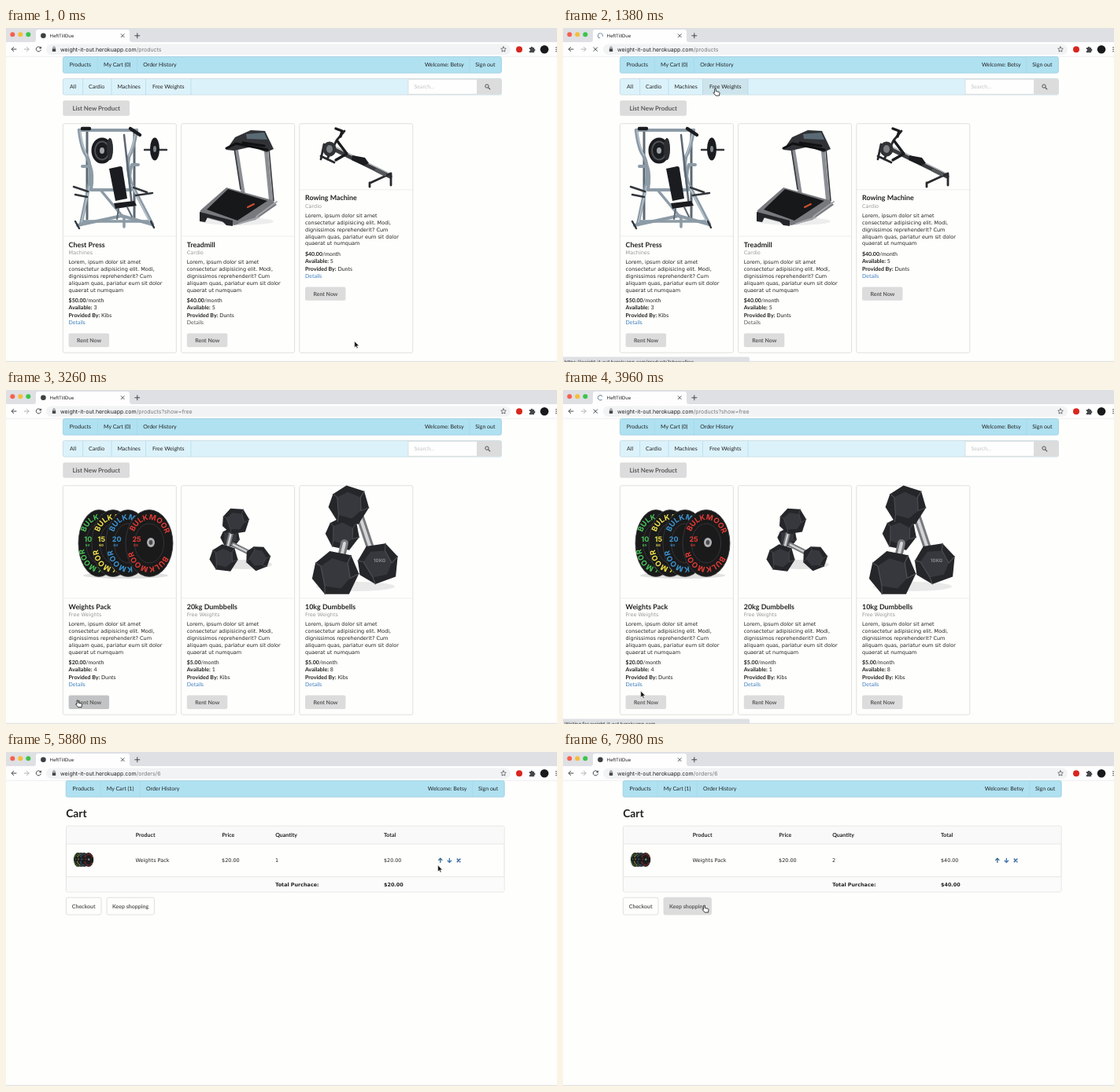
These frames come from a looping animation (700 by 425 pixels, 8 s). An HTML page:

```html
<!DOCTYPE html>
<html lang="en">
<head>
<meta charset="utf-8">
<title>Equipment rental</title>
<style>
html, body { margin: 0; width: 100%; height: 100%; overflow: hidden; background: #fefefd; }
svg { display: block; width: 700px; height: 425px; text-rendering: geometricPrecision; }
text { font: 7px Lato, sans-serif; fill: #222; white-space: pre; }
.b { font-weight: 700; }
.ui { font-family: Inter, sans-serif; }
.v { font: 6.5px "DejaVu Sans", sans-serif; }
.vb { font: 700 6.4px "DejaVu Sans", sans-serif; }
.btn { fill: #5a5a5a; font-weight: 700; }
.ln { fill: none; stroke-linecap: round; stroke-linejoin: round; }
</style>
</head>
<body>
<svg id="stage" viewBox="0 0 700 425"></svg>
<script>
const LOOP = 8000;
const SITE = 'weight-it-out.herokuapp.com';
const PAGE = '#fefefd', BORDER = '#d9d9d2', GREY = '#dcdcdd', INK = '#45474a';

const text = (x, y, s, cls = '', style = '') => `<text x="${x}" y="${y}" class="${cls}" style="${style}">${s}</text>`;
const rect = (x, y, w, h, fill, extra = '') => `<rect x="${x}" y="${y}" width="${w}" height="${h}" fill="${fill}" ${extra}/>`;
const line = (d, stroke, w = 1, extra = '') => `<path class="ln" d="${d}" stroke="${stroke}" stroke-width="${w}" ${extra}/>`;
const shape = (d, fill, extra = '') => `<path d="${d}" fill="${fill}" ${extra}/>`;
const oval = (x, y, rx, ry, fill, extra = '') => `<ellipse cx="${x}" cy="${y}" rx="${rx}" ry="${ry}" fill="${fill}" ${extra}/>`;
const group = (id, body, extra = '') => `<g id="${id}" ${extra}>${body}</g>`;
const edge = `stroke="${BORDER}" stroke-width=".8"`;

// Browser window
const browser = () =>
  rect(0, 0, 700, 18, '#dee0e4') +
  shape('M35 18q3 0 3-3V5q0-3 3-3h113q3 0 3 3v10q0 3 3 3z', '#fefefe') +
  ['#f7604f', '#f5bd3b', '#3ec34c'].map((c, i) => oval(8.3 + i * 10, 8.2, 3, 3, c)).join('') +
  text(55.5, 11.8, 'HeftTillDue', 'ui', 'font-size:5.9px') +
  line('M146.2 7.7l4 4m0-4l-4 4', INK, .9) +
  line('M163.8 9.8h6m-3-3v6', INK, 1) +
  rect(0, 18, 700, 18.2, '#fefefe') +
  rect(51, 20.5, 590, 13.6, '#f1f3f4', 'rx="6.8"') +
  line('M13 27H7.2m2.6-2.7L7.2 27l2.6 2.7', INK, 1) +
  line('M23.3 27h5.8m-2.6-2.7L29.1 27l-2.6 2.7', '#b0b2b5', 1) +
  group('reload', line('M44 25.2a3.1 3.1 0 1 0 .3 2.8', INK, 1) + shape('M44.9 23.2v3.1h-3.1z', INK)) +
  group('stop', line('M39 24.8l4.6 4.6m0-4.6L39 29.4', INK, 1)) +
  rect(58.8, 26.2, 4.4, 3.8, INK, 'rx=".5"') + line('M59.8 26v-1a1.2 1.2 0 0 1 2.4 0v1', INK, .7) +
  `<text x="69" y="29.5" class="ui">${SITE}<tspan id="path" fill="#77797c"></tspan></text>` +
  line('M632 23.8l1 2.1 2.3.3-1.7 1.6.4 2.3-2-1.1-2 1.1.4-2.3-1.7-1.6 2.3-.3z', INK, .7) +
  oval(652, 27.2, 4, 4, '#d8261f') +
  shape('M664.8 25h1.9a1.3 1.3 0 0 1 2.6 0h1.8v1.8a1.3 1.3 0 0 1 0 2.6v1.8h-6.3v-2a1.2 1.2 0 0 0 0-2.4z', INK) +
  oval(684, 27.2, 5.3, 5.3, '#17191a') +
  [24.7, 27.2, 29.7].map(y => oval(699, y, .8, .8, INK)).join('') +
  group('icon', oval(47.4, 9.8, 3.3, 3.3, '#3c4043')) +
  group('spinner', line('M47.4 6.8a3 3 0 1 1-3 3', '#7a8fa8', 1)) +
  line('M0 36.3H700', '#e2e3e5', .6) +
  line('M0 424.3H700', '#d8d9d6', .9);

// Site header
const bar = (y, h, fill, border) => rect(72.4, y, 557, h, fill, `rx="2" stroke="${border}" stroke-width=".8"`);
const seps = (xs, y, h) => xs.map(x => line(`M${x} ${y}v${h}`, '#a9d3e2', .6)).join('');
const navBar = cart =>
  bar(36.6, 20.6, '#afe1f1', '#9ccfe0') + seps([116.3, 166.5, 588.8], 37, 20) +
  text(80.8, 49.2, 'Products') + text(124, 49.2, `My Cart (${cart})`) + text(174.2, 49.2, 'Order History') +
  text(532, 49.2, 'Welcome: Betsy') + text(596.3, 49.2, 'Sign out');
const menu = () =>
  bar(64.4, 20.6, '#dcf2fb', '#c3d9e1') +
  group('menuHover', rect(177.5, 64.8, 57.5, 19.8, '#cde4ec')) +
  seps([97.6, 134, 177.5, 235], 65, 19.6) +
  [[81, 'All'], [105, 'Cardio'], [141.4, 'Machines'], [186, 'Free Weights']].map(([x, s]) => text(x, 77, s)).join('') +
  rect(511, 65.2, 87.5, 19, '#fefefe', edge) + text(518.5, 77, 'Search...', '', 'fill:#c4c4c4') +
  rect(598.5, 64.8, 30.8, 19.8, GREY, 'rx="2"') +
  `<circle cx="611" cy="74" r="2.2" fill="none" stroke="${INK}" stroke-width=".9"/>` + line('M612.8 75.8l2 2', INK, 1.1) +
  rect(72.3, 92.2, 84.7, 19.5, GREY, 'rx="2"') + text(84.4, 105, 'List New Product', 'btn', 'font-size:7.9px');

// Product cards
const LOREM = ['Lorem, ipsum dolor sit amet', 'consectetur adipisicing elit. Modi,', 'dignissimos reprehenderit? Cum',
  'aliquam quas, pariatur eum sit dolor', 'quaerat ut numquam'];
const card = (i, title, kind, price, stock, owner, picture, base = 265, link = '#3f7fbd') => {
  const x = 72.4 + i * 150.2, tx = x + 7.2;
  const fact = (dy, label, value) => `<text x="${tx}" y="${base + dy}"><tspan class="b">${label}</tspan>${value}</text>`;
  return rect(x, 121.7, 144, 291.5, PAGE, `rx="2" ${edge}`) + picture +
    line(`M${x} ${base}h144`, '#e6e6e2', .7) +
    text(tx, base + 13.6, title, 'b', 'font-size:8.9px') +
    text(tx, base + 23, kind, 'v', 'fill:#999') +
    LOREM.map((s, n) => text(tx, base + 35.2 + n * 8.85, s, 'v')).join('') +
    fact(83.7, `$${price}.00`, '/month') + fact(93.4, 'Available:', ' ' + stock) + fact(102.7, 'Provided By:', ' ' + owner) +
    text(tx, base + 112, 'Details', '', `fill:${link}`) +
    rect(tx, base + 123.6, 51.5, 17.4, GREY, `rx="2" class="rent${i}"`) + text(tx + 10.4, base + 134.8, 'Rent Now', 'btn');
};

const STEEL = '#8c9ba6', SHADE = '#5c6872', DARK = '#1b1c1f';
const press = () =>
  line('M103 131v112M163 131v112', SHADE, 3) +
  line('M93 130h73M97 176h10q4 10 1 30h51q-4-20 1-32h8M91 251l56-12 39 11', STEEL, 4) +
  line('M93 130q3 24 9 32 7 12 4 36l-11 52M166 130q-4 24-10 34-3 14 3 34l27 52', STEEL, 4.5) +
  line('M120 206l30 36v11M98 246h84', STEEL, 3.5) +
  line('M94 131q3 22 9 31M165 131q-4 22-9 32M96 247l10-46M183 247l-24-48', '#c6d0d7', 1.1) +
  line('M150 136l10 90', SHADE, 2.5) +
  line('M86 202l18 6M88 212l15 3M162 203l17 6M165 213l21-3M176 155h28M88 246l5 9M184 246l4 8', '#33373b', 2.4) +
  oval(122, 156, 13.5, 16.5, DARK) + oval(122, 156, 9, 11.5, 'none', 'stroke="#4d5155" stroke-width="2"') +
  oval(122, 156, 3, 4, '#a0a6aa') + oval(132, 154, 4, 14, '#2c2e31') +
  oval(189, 154, 6, 14.5, DARK) + oval(189, 154, 2, 4, '#7c8286') +
  line('M97 128h9M158 128l12 8', DARK, 4.5) +
  shape('M131 179l14-3q3 0 3 3l6 38-15 3z', DARK) + shape('M137 223l26-3 3 6-27 4z', DARK) +
  line('M143 230l-2 13M154 228l6 12', SHADE, 2);
const treadmill = () =>
  oval(294, 246, 46, 5, '#ededee') +
  line('M292 152l9 57M330 152l7 72', '#8b8e92', 5) + line('M290 153l8 52M334 154l6 66', '#343639', 1.6) +
  shape('M247 232l33-29 58 16 6 6-27 19-27 7-44-12z', '#77797d') +
  shape('M255 231l27-26 50 15-38 25z', '#17181a') + line('M318 240l26-19M296 249l25-8', '#a3a6aa', 2) +
  shape('M246 234l42 11v7l-8-1-5-5-19-5-3 6-7-1z', '#242528') + line('M307 228l8-4', '#d0502f', 2) +
  shape('M291 139l20-9 18 1 11 23-9 4-19-7-22 5-10-1z', '#303236') +
  shape('M305 135l23-2 4 9-26-1z', '#596a74') + line('M280 153l12-6 40 8M301 146l27 4', '#101112', 3);
const rower = () =>
  line('M412 152l76 37', '#3a3c3f', 5) + line('M414 149l73 36', '#a5a8aa', 1.2) +
  line('M404 148l-4 19m0-4l17 8M408 167l12-24 10-12M463 197l26-12v15m-27-3v5', '#28292c', 2.8) +
  oval(411, 154, 8.5, 9.5, '#303235') + oval(411, 154, 4, 5, '#7b7f83') +
  line('M419 128l8 3-2 7M421 144l12 16-14 8', DARK, 3.4) +
  shape('M440 162l16 3 5 7-6 3-16-7z', DARK) + line('M471 181l10 5', '#54575a', 5);

const plate = (id, x, rx, color, kg) =>
  oval(x, 195, rx, 42.5, '#1a1a1b', 'stroke="#3d3d40" stroke-width=".8"') +
  oval(x, 195, rx * .62, 25, 'none', 'stroke="#343437" stroke-width="1"') +
  `<path id="${id}" fill="none" d="M${x - rx * .74} 195a${rx * .74} 30 0 0 1 ${rx * 1.48} 0a${rx * .74} 30 0 0 1 ${-rx * 1.48} 0"/>` +
  ['9%', '60%'].map(o => `<text class="ui b" style="font-size:9.5px;fill:${color}"><textPath href="#${id}" startOffset="${o}">BULKMOOR</textPath></text>`).join('') +
  text(x - rx * .72, 193, kg, 'ui b', `font-size:9px;fill:${color}`) +
  text(x - rx * .66, 199, 'KG', 'ui b', `font-size:4px;fill:${color}`);
const plates = id =>
  oval(152, 236, 54, 4, '#e0e0e0') +
  plate(id + 'a', 118, 26, '#4ac35a', 10) + plate(id + 'b', 136, 27, '#efe34b', 15) +
  plate(id + 'c', 155, 28, '#3c94d0', 20) + plate(id + 'd', 182, 30, '#e23b34', 25) +
  oval(184, 194, 5, 6, '#b0b1b3') + oval(184, 194, 2.4, 3, '#4b4c4e');

const hexHead = (x, y, r, turn) =>
  `<g transform="translate(${x} ${y}) rotate(${turn}) scale(${r})">` +
  shape('M-.95-.35L-.4-.95.55-.9 1-.15.7.8-.35.95-1 .35z', '#252629') +
  shape('M-.7-.25L-.25-.65.45-.55.65.1.3.6-.4.6z', '#37383d') +
  line('M-.95-.35L-.7-.25-.4.6-.35.95M.55-.9L.45-.55.65.1 1-.15', '#505157', .04) + '</g>';
const handle = (d, w) => line(d, '#77797c', w) + line(d, '#d3d4d6', w * .4);
const smallBells = () =>
  oval(303, 222, 35, 6, '#e4e4e4') + hexHead(285, 188, 12, 20) + handle('M286 182l-6 24M289 197l28 14', 6) +
  hexHead(292, 167, 17, 0) + hexHead(277, 214, 17.5, 15) + hexHead(320, 214, 15.5, 50);
const bigBells = () =>
  oval(444, 250, 50, 6, '#e9e9e9') + hexHead(428, 183, 21, 20) + handle('M430 195l-6 26M450 162l14 42', 10) +
  hexHead(436, 147, 25, 15) + hexHead(419, 234, 29, 8) + hexHead(473, 221, 26, -12) +
  text(467, 219, '10KG', 'ui b', 'font-size:6px;fill:#8b8c90');

// Cart
const cart = () => {
  const row = (y, cls, cells) => cells.map(([x, s]) => text(x, y, s, cls)).join('');
  const amount = (id, y, cls) => `<text id="${id}" x="480" y="${y}" class="${cls}" style="font-size:6.4px"></text>`;
  return group('', navBar(1), 'transform="translate(3.8)"') +
    text(76.2, 83, 'Cart', 'b', 'font-size:13.8px') +
    rect(76.4, 94.2, 556.6, 83.8, PAGE, `rx="2" ${edge}`) + rect(76.8, 94.6, 555.8, 22.4, '#f8f9f8') +
    rect(76.8, 159, 555.8, 18.6, '#fafbfa') + line('M76.4 117h556.6M76.4 158.7h556.6', '#e2e2dc', .8) +
    row(108, 'b', [[164.8, 'Product'], [274.5, 'Price'], [342.2, 'Quantity'], [480, 'Total']]) +
    group('', plates('m'), 'transform="translate(86 137) scale(.21) translate(-92 -195)"') +
    row(140.2, 'v', [[164.5, 'Weights Pack'], [274, '$20.00']]) +
    '<text id="count" x="342" y="140.2" class="v"></text>' + amount('total', 140.2, 'v') +
    text(342.2, 170.8, 'Total Purchace:', 'vb') + amount('sum', 170.8, 'vb') +
    line('M551.8 140.4v-5m-2.2 2.2l2.2-2.4 2.2 2.4', '#3b6c8c', 1.3) +
    line('M563.4 135.4v5m-2.2-2.2l2.2 2.4 2.2-2.4', '#3d74ad', 1.3) +
    line('M573.3 136.2l3.6 3.6m0-3.6l-3.6 3.6', '#3d69a5', 1.6) +
    rect(76.4, 185.2, 44.6, 21.8, PAGE, `rx="2" ${edge}`) + text(83.8, 198.6, 'Checkout', 'btn') +
    rect(128, 185.2, 60.4, 21.8, PAGE, `id="keep" rx="2" ${edge}`) + text(135, 198.6, 'Keep shopping', 'btn');
};

const arrow = shape('M0 0v8.2l1.9-1.8 1.2 2.9 1.4-.6-1.2-2.8h2.6z', '#111', 'stroke="#fff" stroke-width=".6"');
const hand = shape('M-.9 0q.9-.9 1.6 0l.2 3 4 1q.7.4.6 1.3L5 8.6H.6L-2.4 5q0-1.2 1.5-.3z', '#fff', 'stroke="#111" stroke-width=".8"');

document.getElementById('stage').innerHTML =
  rect(0, 0, 700, 425, PAGE) + browser() +
  group('shop', navBar(0) + menu() +
    group('all',
      card(0, 'Chest Press', 'Machines', 50, 3, 'Kibs', press()) +
      card(1, 'Treadmill', 'Cardio', 40, 5, 'Dunts', treadmill(), 265, '#555') +
      card(2, 'Rowing Machine', 'Cardio', 40, 5, 'Dunts', rower(), 205.8)) +
    group('free',
      card(0, 'Weights Pack', 'Free Weights', 20, 4, 'Dunts', plates('p')) +
      card(1, '20kg Dumbbells', 'Free Weights', 5, 1, 'Kibs', smallBells()) +
      card(2, '10kg Dumbbells', 'Free Weights', 5, 8, 'Kibs', bigBells()))) +
  group('cart', cart()) +
  group('status', rect(-2, 418.4, 239, 12, '#dee0e3', 'rx="2"') + '<text id="note" x="2" y="427.3" class="ui" style="font-size:6px"></text>') +
  group('cursor', group('arrow', arrow) + group('hand', hand));

// Pointer stops: time, x, y
const stops = [[0, 442.7, 398.5], [120, 442.7, 398.5], [800, 193.5, 77.5], [1500, 193.5, 77.5], [2060, 138.5, 217.5],
  [2500, 138.5, 217.5], [3060, 91, 395], [3850, 91, 395], [4420, 169, 274.5], [4950, 169, 274.5], [5640, 548.6, 144],
  [5900, 548.6, 144], [6060, 551.5, 137.5], [7400, 551.5, 137.5], [7860, 179.5, 195.5], [8000, 179.5, 195.5]];
const ease = p => p * p * (3 - 2 * p);
const pointer = t => {
  const i = stops.findIndex(s => s[0] > t), a = stops[i - 1], b = stops[i];
  const p = ease((t - a[0]) / (b[0] - a[0]));
  return [a[1] + (b[1] - a[1]) * p, a[2] + (b[2] - a[2]) * p];
};

const el = id => document.getElementById(id);
const show = (id, on) => el(id).setAttribute('visibility', on ? 'inherit' : 'hidden');
const put = (id, s) => { if (el(id).textContent !== s) el(id).textContent = s; };
const rent = document.querySelector('#free .rent0');
const FILTERED = 1680, ORDERED = 4250, DOUBLED = 6900;

function draw(t) {
  const within = (a, b) => t >= a && t < b;
  const [x, y] = pointer(t);
  const over = (l, r, top, bottom) => x > l && x < r && y > top && y < bottom;
  const inCart = t >= ORDERED, filtered = t >= FILTERED;
  const onMenu = !inCart && over(177, 235, 64, 85);
  const onRent = filtered && !inCart && over(79, 131, 388, 406);
  const onUp = inCart && over(549, 555, 134, 142);
  const onKeep = inCart && over(128, 188, 185, 207);
  const loading = within(1180, FILTERED) || within(3480, ORDERED) || within(6250, DOUBLED);
  const pointing = onMenu || onRent || onUp || onKeep;

  show('shop', !inCart);
  show('all', !inCart && !filtered);
  show('free', !inCart && filtered);
  show('cart', inCart);
  show('menuHover', onMenu);
  rent.setAttribute('fill', onRent ? '#c2c3c4' : GREY);
  el('keep').setAttribute('fill', onKeep ? GREY : PAGE);

  put('path', inCart ? '/orders/6' : filtered ? '/products?show=free' : '/products');
  const n = t >= DOUBLED ? 2 : 1;
  put('count', String(n));
  put('total', `$${n * 20}.00`);
  put('sum', `$${n * 20}.00`);

  show('status', within(920, 2320) || within(3520, 5000) || within(6300, 7450));
  put('note', t < 2400 ? `https://${SITE}/products?show=free` : `Waiting for ${SITE}...`);
  show('icon', !loading);
  show('spinner', loading);
  show('reload', !loading);
  show('stop', loading);
  el('spinner').setAttribute('transform', `rotate(${t * .4} 47.4 9.8)`);

  show('arrow', !pointing);
  show('hand', pointing);
  el('cursor').setAttribute('transform', `translate(${x} ${y})`);
}

const start = performance.now();
function tick() {
  draw((performance.now() - start) % LOOP);
  requestAnimationFrame(tick);
}
tick();
</script>
</body>
</html>
```
